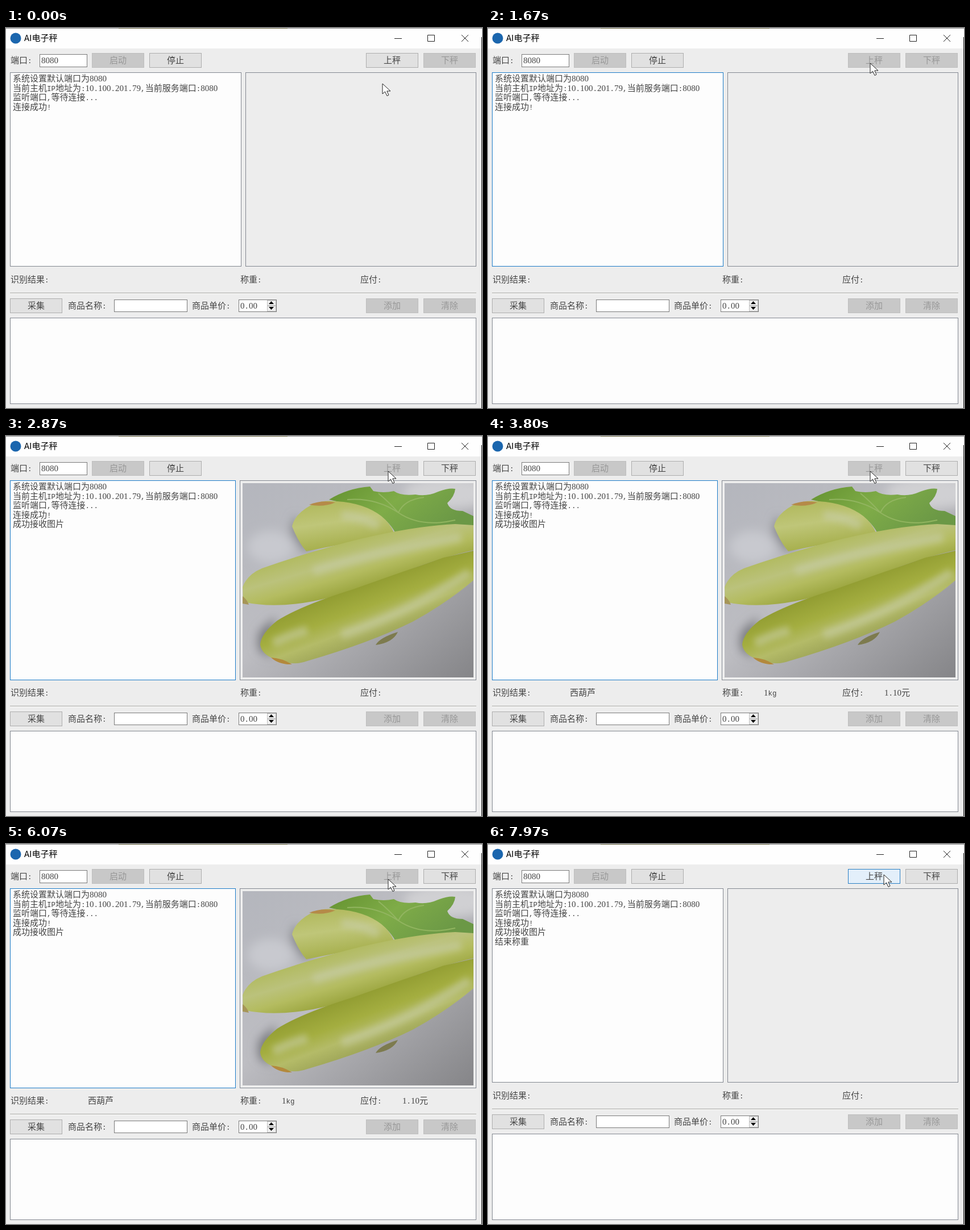
Write an HTML page that moves like this. It is 837 px wide and 669 px high and loops after 8000 ms.

```html
<!DOCTYPE html>
<html lang="zh-CN">
<head>
<meta charset="utf-8">
<title>AI电子秤</title>
<style>
html, body { margin: 0; width: 100%; height: 100%; overflow: hidden; background: #ededed; }
svg { display: block; width: 100%; height: 100%; }
text { font: 300 15px "Noto Sans CJK SC", "Noto Sans CJK", sans-serif; fill: #444; white-space: pre; }
.latin { font: 12.5px "Liberation Mono", monospace; }
.digits { font: 15px "Liberation Serif", serif; }
.title { font-weight: 400; fill: #000; }
.middle { text-anchor: middle; }
.off { fill: #979797; }
.line { fill: none; stroke: #222; }
</style>
</head>
<body>
<svg viewBox="0 0 837 669">
  <defs>
    <linearGradient id="wall" x2="1" y2="1">
      <stop stop-color="#b4b6bd"/><stop offset=".45" stop-color="#bdbdc2"/><stop offset="1" stop-color="#858588"/>
    </linearGradient>
    <linearGradient id="leaf" x2="1" y2=".4">
      <stop stop-color="#64922f"/><stop offset=".5" stop-color="#7fac48"/><stop offset="1" stop-color="#6b9846"/>
    </linearGradient>
    <linearGradient id="round" x2=".3" y2="1">
      <stop stop-color="#aeb656"/><stop offset=".5" stop-color="#bfc679"/><stop offset="1" stop-color="#a5ae4a"/>
    </linearGradient>
    <linearGradient id="skin" gradientUnits="userSpaceOnUse" x1="600" y1="187" x2="624" y2="268">
      <stop stop-color="#b2bb62"/><stop offset=".35" stop-color="#bbc27c"/>
      <stop offset=".65" stop-color="#b4bc60"/><stop offset="1" stop-color="#9ca640"/>
    </linearGradient>
    <linearGradient id="shade" gradientUnits="userSpaceOnUse" x1="600" y1="272" x2="634" y2="363">
      <stop stop-color="#929d32"/><stop offset=".4" stop-color="#a4ae40"/>
      <stop offset=".7" stop-color="#b4bb68"/><stop offset="1" stop-color="#a0a759"/>
    </linearGradient>
    <filter id="soft" x="-50%" y="-50%" width="200%" height="200%"><feGaussianBlur stdDeviation="9"/></filter>
    <filter id="streak" x="-50%" y="-50%" width="200%" height="200%"><feGaussianBlur stdDeviation="6"/></filter>
    <clipPath id="frame"><path d="M416 83H822V425H416Z"/></clipPath>
    <g id="photo" clip-path="url(#frame)">
      <path d="M416 83H822V425H416Z" fill="url(#wall)"/>
      <g filter="url(#soft)">
        <ellipse cx="780" cy="100" rx="80" ry="28" fill="#d0d0d3"/>
        <ellipse cx="465" cy="195" rx="40" ry="28" fill="#c8c9cf"/>
        <path d="M508 140L500 170L525 205L550 190Z" fill="#85868b"/>
        <path d="M475 318L445 345L443 375L465 390Z" fill="#75767a"/>
      </g>
      <path d="M568 112Q600 92 640 89L646 97Q664 101 682 97Q695 106 720 103Q740 107 760 98Q778 91 790 93Q789 106 776 118Q780 132 803 132L822 141V160L760 158L685 171Q660 125 590 117Z" fill="url(#leaf)"/>
      <path d="M600 112Q650 108 690 135T790 148M690 135Q700 112 735 108M655 101Q672 115 690 135" fill="none" stroke="#92b560" stroke-width="2"/>
      <path d="M536 122Q555 112 582 115Q630 118 660 141Q676 154 683 172L528 203Q514 187 503 159Q508 137 536 122Z" fill="url(#round)"/>
      <path d="M417 292L416 266Q424 244 450 233Q520 208 600 187Q710 159 790 155L822 157V201Q760 215 690 243Q610 277 540 291Q470 304 417 292Z" fill="url(#skin)"/>
      <path d="M447 367Q449 347 477 325Q520 298 610 270Q700 238 770 214L822 202V254Q775 294 715 327Q640 364 530 396Q500 407 466 390Q449 382 447 367Z" fill="url(#shade)"/>
      <g fill="none" stroke="#c8cda8" stroke-width="16" opacity=".6" filter="url(#streak)">
        <path d="M590 140Q620 140 655 158"/>
        <path d="M540 238Q650 205 800 178"/>
        <path d="M470 365Q500 350 530 342M590 350Q710 310 815 240"/>
      </g>
      <path d="M533 121Q555 112 579 117Q558 126 533 121Z" fill="#b58a48"/>
      <path d="M466 390Q485 391 503 402Q480 403 466 390Z" fill="#b3893c"/>
      <path d="M650 368Q657 355 689 345Q680 364 650 368Z" fill="#7d7b4e"/>
      <path d="M416 282Q424 288 427 297L416 295Z" fill="#a69558"/>
    </g>
  </defs>
  <g id="scene"></g>
  <path id="cursor" d="M0 0V18L4.5 14L8 21.500L11 20L7.800 13H14Z" fill="#fff" stroke="#222"/>
</svg>
<script>
const LOOP = 8000;
const ARRIVE = 600, WEIGH = 1050, PHOTO = 2050, RESULT = 3000;
const LEAVE = 6850, REMOVE = 7400, DONE = 7540, RETURN = 7830;
const EVENTS = [ARRIVE, WEIGH, PHOTO, RESULT, LEAVE, REMOVE, DONE, RETURN];
// time, x, y of the pointer
const PATH = [[250, 662, 98], [700, 672, 62], [6500, 672, 62], [7000, 780, 54], [7650, 780, 54], [7900, 696, 54]];
const LOG = ['系统设置默认端口为8080', '当前主机IP地址为:10.100.201.79,当前服务端口:8080',
  '监听端口,等待连接...', '连接成功!', '成功接收图片', '结束称重'];
const STYLES = {
  on: ['#e1e1e1', '#adadad'],
  off: ['#c8c8c8', '#bebebe'],
  hover: ['#e3effa', '#2a7fc4'],
  pressed: ['#d0e5f6', '#2a7fc4'],
  waking: ['#cecece', '#b8b8b8']
};
const scene = document.getElementById('scene');
const cursor = document.getElementById('cursor');

const text = (x, y, value, cls = '') => `<text x="${x}" y="${y}" class="${cls}">` +
  value.replace(/\d+|[\x20-\x7e]+?(?=\d|[^\x20-\x7e]|$)/g,
    run => `<tspan class="${/\d/.test(run) ? 'digits' : 'latin'}">${run}</tspan>`) + '</text>';
const box = (x, y, w, h, fill = '#fdfdfd', stroke = '#828790') =>
  `<rect x="${x + .5}" y="${y + .5}" width="${w}" height="${h}" fill="${fill}" stroke="${stroke}"/>`;
const button = (x, y, label, mode = 'on') => box(x, y, 91, 25, ...STYLES[mode]) +
  text(x + 46, y + 18, label, mode === 'off' ? 'middle off' : 'middle');

const titleBar = `
  <path d="M0 0H837V36H0Z" fill="#fefefe"/>
  <path d="M0 .5H837" stroke="#8b8b8b"/><path d="M198 .5H495" stroke="#66643f"/>
  <path d="M836.5 16V669" stroke="#222"/>
  <circle cx="17" cy="18" r="9.5" fill="#1b66ae"/>
  <text x="32" y="23" class="title">AI电子秤</text>
  <path class="line" d="M683 18.5H696M741.5 12.5H753.5V23.5H741.5ZM801 12L813 24M813 12L801 24"/>`;

function lowerPart(result) {
  return text(8, 448, '识别结果:') + text(412, 448, '称重:') + text(623, 448, '应付:') +
    (result ? text(144, 448, '西葫芦') + text(485, 448, '1kg') + text(697, 448, '1.10元') : '') +
    '<path d="M7 466.5H827" stroke="#a5a5a0"/><path d="M7 467.5H827" stroke="#fff"/>' +
    button(7, 476, '采集') + text(109, 494, '商品名称:') + box(190, 478, 128, 21, '#fff', '#7a7a7a') +
    text(327, 494, '商品单价:') + box(409, 478, 66, 21, '#fff', '#7a7a7a') + text(412, 494, '0.00') +
    box(459, 479, 15, 9, '#efefef', '#c0c0c0') + box(459, 489, 15, 9, '#efefef', '#c0c0c0') +
    '<path d="M462 486H471L466.5 481ZM462 491H471L466.5 496Z" fill="#000"/>' +
    button(633, 476, '添加', 'off') + button(734, 476, '清除', 'off');
}

function drawScene(t) {
  const photo = t >= PHOTO && t < DONE;
  const focused = t >= WEIGH && t < REMOVE;
  const lines = t >= DONE ? 6 : t >= PHOTO ? 5 : 4;
  const shift = photo ? 9 : 0;
  const paneHeight = photo ? 351 : 341;
  const paneX = photo ? 411 : 421;
  const put = t < ARRIVE ? 'on' : t < WEIGH ? 'hover' : t < REMOVE ? 'off'
    : t < DONE ? 'waking' : t < RETURN ? 'on' : 'hover';
  const take = t < PHOTO ? 'off' : t < LEAVE || t >= DONE ? 'on' : t < REMOVE ? 'hover' : 'pressed';
  return titleBar +
    text(8, 62, '端口:') + box(59, 46, 83, 22, '#fff', '#7a7a7a') + text(62, 62, '8080') +
    button(151, 44, '启动', 'off') + button(252, 44, '停止') +
    button(633, 44, '上秤', put) + button(734, 44, '下秤', take) +
    box(7, 78, photo ? 396 : 406, paneHeight, '#fdfdfd', focused ? '#1c7bc8' : '#828790') +
    LOG.slice(0, lines).map((line, i) => text(12, 94 + i * 16.6, line)).join('') +
    box(paneX, 78, 826 - paneX, paneHeight, '#ededed') +
    (photo ? '<use href="#photo"/>' : '') +
    `<g transform="translate(0 ${shift})">${lowerPart(t >= RESULT && t < DONE)}</g>` +
    box(7, 510 + shift, 819, 151 - shift);
}

function pointerAt(t) {
  const next = PATH.findIndex(point => point[0] > t);
  if (next === 0) return PATH[0].slice(1);
  if (next < 0) return PATH[PATH.length - 1].slice(1);
  const [t0, x0, y0] = PATH[next - 1], [t1, x1, y1] = PATH[next];
  const p = (t - t0) / (t1 - t0), k = p * p * (3 - 2 * p);
  return [x0 + (x1 - x0) * k, y0 + (y1 - y0) * k];
}

let shown = -1;
function render() {
  const t = performance.now() % LOOP;
  const phase = EVENTS.filter(event => event <= t).length;
  if (phase !== shown) {
    scene.innerHTML = drawScene(t);
    shown = phase;
  }
  cursor.setAttribute('transform', `translate(${pointerAt(t).map(Math.round).join(' ')})`);
  requestAnimationFrame(render);
}
render();
</script>
</body>
</html>
```
